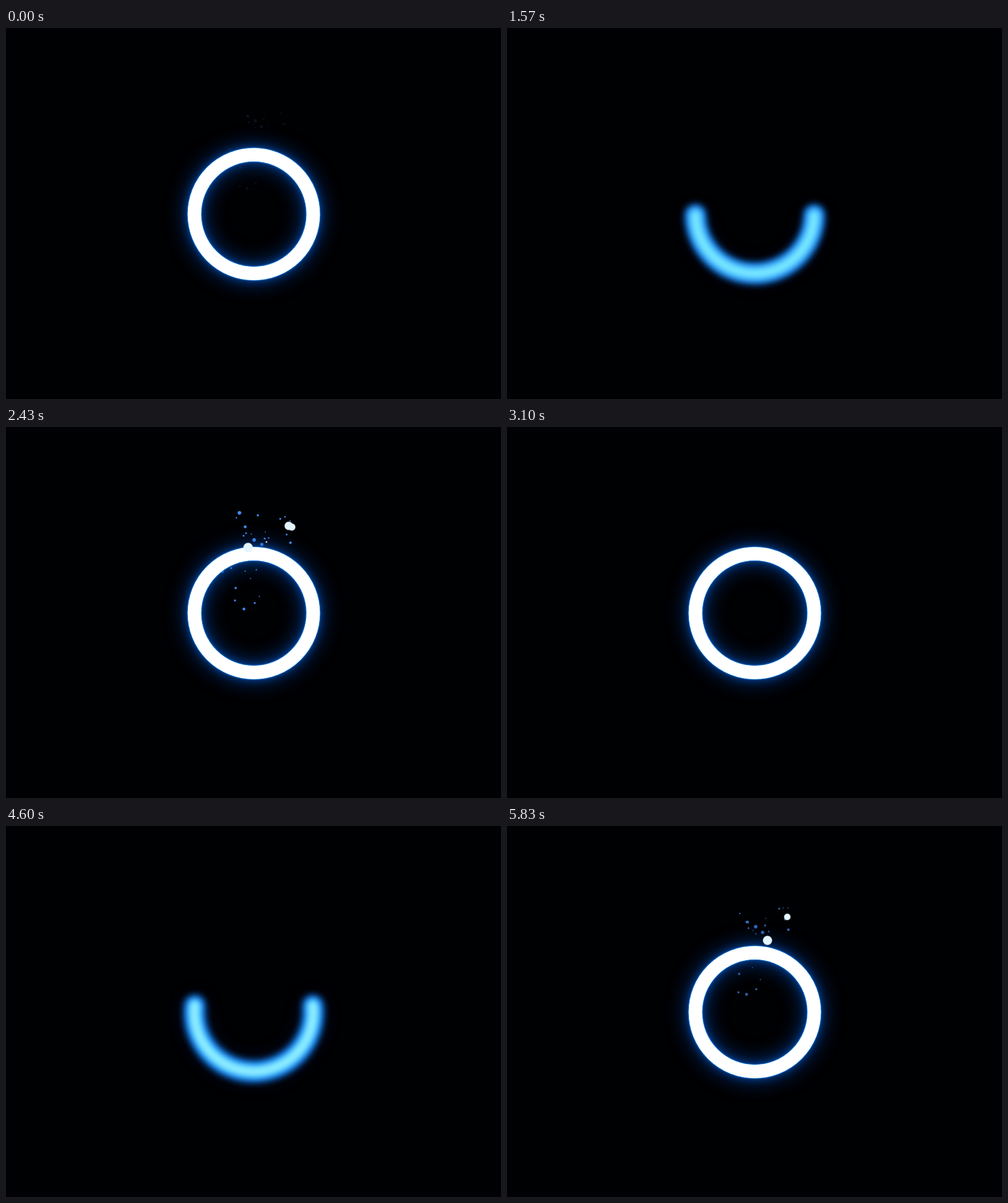
Recreate the animation shown at these times as an HTML page with a canvas. Size 800 by 600 pixels, loop 5860 ms.

```html
<!DOCTYPE html>
<html lang="en">
<head>
<meta charset="utf-8">
<title>Glowing ring</title>
<style>
html, body { margin: 0; width: 100%; height: 100%; overflow: hidden; background: #000103; }
canvas { display: block; width: 800px; height: 600px; }
</style>
</head>
<body>
<canvas id="stage" width="800" height="600"></canvas>
<script>
const ctx = document.getElementById('stage').getContext('2d');
const LOOP = 5860, CYCLE = 3000, START = 500;
const CX = 400.5, CY = 301, R = 96, W = 21.5;
const TOP = CY - R, BOTTOM = CY + R;
const FAR = 2000;

// Phases of one cycle, in ms
const FALL = 479, HALF = 1070, CLOSE = 1590, G = 0.00696;
const HIT = FALL + Math.sqrt(2 * (BOTTOM - TOP) / G);
const BURST = 1490, SPRAY = 1550, P1 = 1530, P2 = 1930, P3 = 2330, END = 2600;

const clamp = v => Math.max(0, Math.min(1, v));
const span = (t, a, b) => clamp((t - a) / (b - a));
const mix = (a, b, k) => a + (b - a) * k;
const smooth = k => k * k * (3 - 2 * k);
const easeOut = k => 1 - (1 - k) * (1 - k);
const rgba = (c, a) => `rgba(${c.join(',')},${a})`;

function seeded(seed) {
  return () => {
    seed = (seed * 1664525 + 1013904223) % 4294967296;
    return seed / 4294967296;
  };
}

// Fine spray: two in three above the ring, leaning right; the rest inside it
const rand = seeded(7);
const spray = Array.from({ length: 28 }, (_, i) => {
  const inside = i % 3 === 0, u = rand(), v = rand();
  const x = inside ? mix(326, 426, u) : mix(345, 468, Math.sqrt(u));
  const y = inside ? mix(300, 228, v) : mix(200, 138, v);
  return { x, y, r: 0.9 + 2.4 * rand() ** 1.5, lift: mix(4, 26, rand()) };
});

// Large drops: position and radius when they burst, hang and fade
const drops = [
  { at: [[432, 185], [457, 160], [453, 147]], r: [7, 7, 5.6] },
  { at: [[404, 201], [391, 195], [421, 185]], r: [8, 7.8, 7.8] }
];
for (let i = 0; i < 3; i++) {
  const fan = (dx, dy) => [380 + dx * i, 210 + dy * i];
  drops.push({ at: [fan(24, -7), fan(41, -24), fan(41, -34)], r: [5.6, 1.5 * i * i, 0] });
}

// Strokes the path blurred by sigma, drawing only its shadow
function softStroke(path, width, sigma, color, alpha) {
  if (alpha <= 0) return;
  ctx.save();
  ctx.lineWidth = width;
  ctx.lineCap = 'round';
  if (sigma < 0.4) {
    ctx.strokeStyle = rgba(color, alpha);
  } else {
    ctx.strokeStyle = '#000';
    ctx.shadowColor = rgba(color, alpha);
    ctx.shadowBlur = sigma * 2;
    ctx.shadowOffsetX = FAR;
    ctx.translate(-FAR, 0);
  }
  ctx.stroke(path);
  ctx.restore();
}

function arcPath(mid, half) {
  const p = new Path2D();
  if (half >= Math.PI) p.arc(CX, CY, R, 0, Math.PI * 2);
  else p.arc(CX, CY, R, mid - half, mid + half + 0.001);
  return p;
}

function linePath(y, len) {
  const p = new Path2D();
  p.moveTo(CX - 0.5, y - len / 2);
  p.lineTo(CX - 0.5, y + len / 2 + 0.01);
  return p;
}

// The ring gathers at the top, falls as a drop and climbs both sides again
function shapeAt(q) {
  if (q < FALL) return arcPath(-Math.PI / 2, Math.PI * (1 - smooth(q / FALL)));
  if (q < HIT) {
    const d = q - FALL;
    return linePath(TOP + G * d * d / 2, G * d * 11);
  }
  if (q >= CLOSE) return arcPath(Math.PI / 2, Math.PI);
  const d = q - HIT;
  const deg = 0.288 * d - 1e-4 * d * d + 16 * span(q, P1, CLOSE);
  return arcPath(Math.PI / 2, Math.min(deg, 179.9) * Math.PI / 180);
}

// sharp: edge hardness, white: heat of the core, halo: wide glow
function lookAt(q) {
  if (q < HIT) return { sharp: 1 - 0.5 * smooth(span(q, 0, 200)), white: 1, halo: 1 };
  if (q < HALF) {
    const k = smooth(span(q, HIT, 900));
    return { sharp: mix(0.5, 0, k), white: 1 - k, halo: mix(1, 0.2, k) };
  }
  const sharp = 0.5 * span(q, HALF, P1) + 0.5 * smooth(span(q, P1, 1880));
  return { sharp, white: span(q, HALF, 1270), halo: mix(0.2, 1, span(q, HALF, 1200)) };
}

function drawLight(q) {
  const path = shapeAt(q), { sharp, white, halo } = lookAt(q);
  softStroke(path, W, 17, [0, 85, 200], 0.8 * halo);
  softStroke(path, mix(30, W, sharp), 7, [8, 105, 230], 0.65);
  softStroke(path, mix(31, 23, sharp), mix(6, 0.9, sharp), [30, 142, 255], 1);
  softStroke(path, mix(18, W, sharp), mix(5.2, 0.2, sharp), [122, 234, 255], 1);
  softStroke(path, mix(11, W, sharp), mix(4, 0.2, sharp), [255, 255, 255], white);
}

function dot(x, y, r, color, alpha) {
  if (r <= 0 || alpha <= 0) return;
  const g = ctx.createRadialGradient(x, y, Math.max(0, r - 1), x, y, r + 0.5);
  g.addColorStop(0, rgba(color, alpha));
  g.addColorStop(1, rgba(color, 0));
  ctx.fillStyle = g;
  ctx.beginPath();
  ctx.arc(x, y, r + 0.5, 0, Math.PI * 2);
  ctx.fill();
}

function drawSpray(q) {
  if (q < SPRAY || q >= END) return;
  const alpha = 1 - 0.25 * span(q, P2, P3) - 0.75 * easeOut(span(q, P3, END));
  const out = easeOut(span(q, SPRAY, P2));
  const drift = span(q, P2, P3), rise = span(q, P3, END) * 1.6;
  for (const { x, y, r, lift } of spray) {
    const px = mix(402, x, out) + (410 - x) * 0.1 * (drift + rise);
    const py = mix(203, y, out) - lift * drift - 13 * rise;
    dot(px, py, r, [68, 142, 245], alpha);
  }
}

function drawDrops(q) {
  if (q < BURST) return;
  const born = span(q, BURST, P1), fade = 1 - span(q, P3, 2470);
  const out = easeOut(span(q, P1, P2)), drift = span(q, P2, P3);
  const along = (a, b, c) => mix(mix(a, b, out), c, drift);
  for (const { at: [a, b, c], r } of drops) {
    const x = mix(402, along(a[0], b[0], c[0]), born);
    const y = mix(TOP, along(a[1], b[1], c[1]), born);
    dot(x, y, along(...r) * born * fade, [228, 245, 253], 1);
  }
}

function clipped(draw, q) {
  ctx.save();
  ctx.beginPath();
  ctx.rect(0, 132, 800, 468);
  ctx.clip();
  draw(q);
  ctx.restore();
}

function render(now) {
  // 30 steps per second
  const t = Math.floor((now % LOOP + 4) * 0.03) / 0.03;
  const q = (t - START + CYCLE) % CYCLE;
  ctx.fillStyle = '#000103';
  ctx.fillRect(0, 0, 800, 600);
  clipped(drawSpray, q);
  drawLight(q);
  clipped(drawDrops, q);
}

const begin = performance.now();
function tick() {
  render(performance.now() - begin);
  requestAnimationFrame(tick);
}
tick();
</script>
</body>
</html>
```
